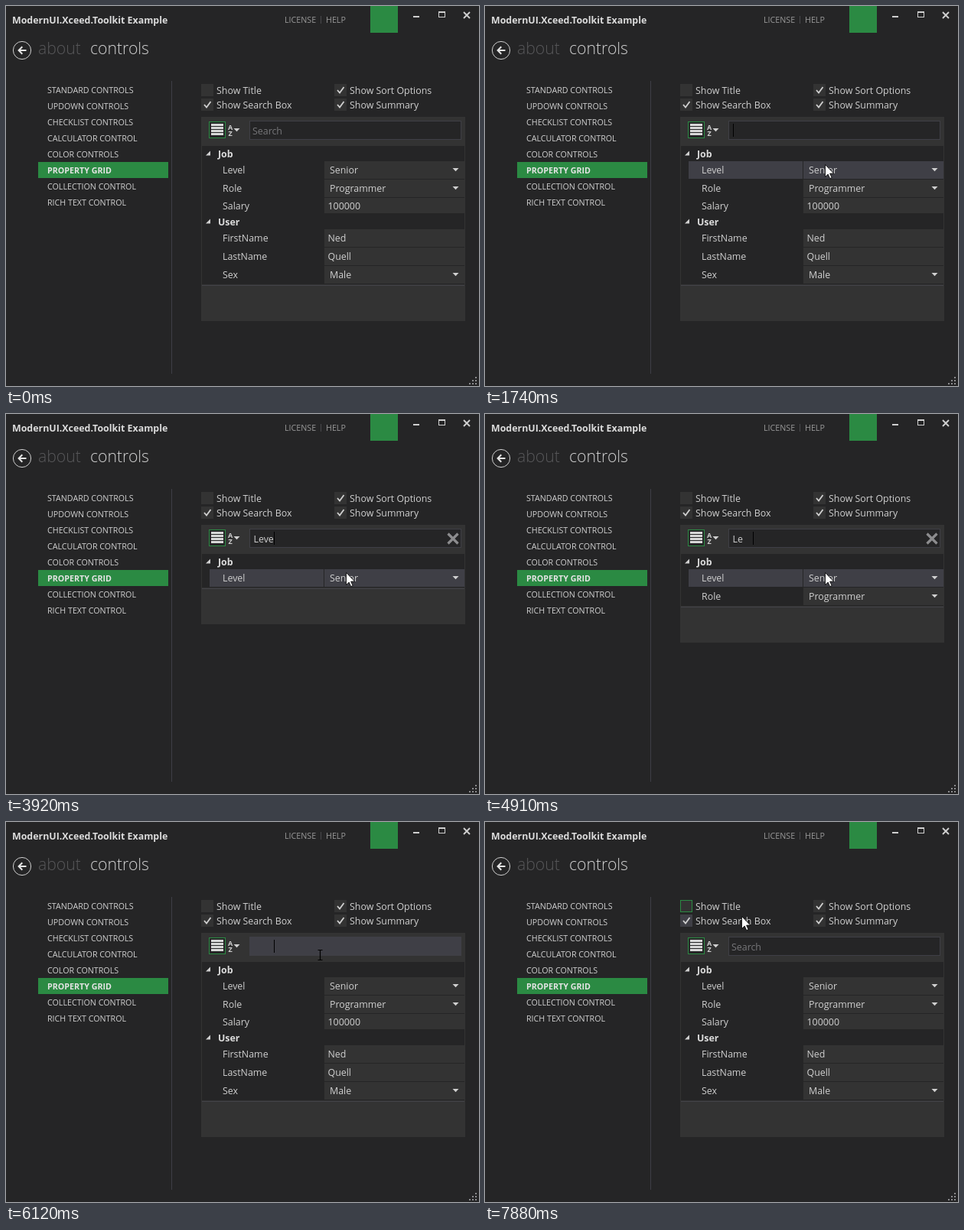
Recreate the animation shown at these times as an HTML page. Size 618 px wide and 497 px high, loop 8 s.

```html
<!DOCTYPE html>
<html lang="en">
<head>
<meta charset="utf-8">
<title>Property grid</title>
<style>
  html, body { margin: 0; width: 100%; height: 100%; overflow: hidden; background: #252526; }
  svg { display: block; width: 100%; height: 100%; }
  text { font-family: "Open Sans", "Noto Sans", sans-serif; font-size: 12.4px; fill: #d0d0d0; white-space: pre; }
  .bold { font-weight: 700; }
  .small { font-size: 10.7px; }
  .big { font-size: 21.2px; font-weight: 300; }
  .tiny { font-size: 9px; font-weight: 700; }
</style>
</head>
<body>
<svg id="stage" viewBox="0 0 618 497"><g id="frame"></g><g id="grid"></g></svg>
<script>
const LOOP = 8000;
const BG = '#252526', PANEL = '#333333', HOVER = '#3f3f46', GREEN = '#2b8a43', LIGHT = '#d0d0d0';

const MENU = ['STANDARD CONTROLS', 'UPDOWN CONTROLS', 'CHECKLIST CONTROLS', 'CALCULATOR CONTROL',
  'COLOR CONTROLS', 'PROPERTY GRID', 'COLLECTION CONTROL', 'RICH TEXT CONTROL'];

const GROUPS = [
  ['Job', [
    { name: 'Level', value: 'Senior', list: true, height: 24 },
    { name: 'Role', value: 'Programmer', list: true, height: 24 },
    { name: 'Salary', value: '100000', height: 21 }]],
  ['User', [
    { name: 'FirstName', value: 'Ned', height: 24 },
    { name: 'LastName', value: 'Quell', height: 24 },
    { name: 'Sex', value: 'Male', list: true, height: 24 }]]
];

// [time, x, y]: pointer positions, each held until the next
const POINTER = [
  [220, 470, 345], [320, 388, 177], [650, 372, 172], [760, 361, 170], [870, 356, 170],
  [1640, 410, 188], [1740, 444, 207], [5900, 443, 207], [6010, 432, 195], [6120, 410, 174],
  [6230, 382, 154], [6340, 354, 134], [6450, 336, 120], [6570, 326, 109],
  [7780, 331, 116], [7880, 335, 123]
];

// [time, typed text, applied filter]
const TYPING = [
  [0, '', ''], [2830, 'L', 'l'], [3160, 'Le', 'le'], [3390, 'Lev', 'le'], [3490, 'Lev', 'lev'],
  [3920, 'Leve', 'leve'], [4700, 'Lev', 'lev'], [4910, 'Le', 'le'], [5130, 'L', 'l'], [5350, '', '']
];

const FOCUS = 1420, BLUR = 6680, CARET_STUCK = 3920;
const TITLE_ON = 6800, PRESS_OFF = 7560, TITLE_OFF = 7670;

const rect = (x, y, w, h, fill, extra = '') =>
  `<rect x="${x}" y="${y}" width="${w}" height="${h}" fill="${fill}" ${extra}/>`;
const text = (x, y, s, cls = '', fill = LIGHT) =>
  `<text x="${x}" y="${y}" class="${cls}" style="fill:${fill}">${s}</text>`;
const path = (d, fill, extra = '') => `<path d="${d}" fill="${fill}" ${extra}/>`;
const line = (d, color, width = 1) => path(d, 'none', `stroke="${color}" stroke-width="${width}"`);
const box = (x, y, w, h, fill, stroke) => rect(x + .5, y + .5, w - 1, h - 1, fill, `stroke="${stroke}"`);
const arrowDown = (x, y) => path(`M${x} ${y}h8l-4 4.2z`, LIGHT);
const at = (keys, t) => keys.filter(k => k[0] <= t).pop();
const inside = (p, x, y, w, h) => !!p && p[1] >= x && p[1] < x + w && p[2] >= y && p[2] < y + h;

function windowFrame() {
  let s = rect(0, 0, 618, 497, BG);
  s += text(8, 23, 'ModernUI.Xceed.Toolkit Example', 'bold', '#dcdcdc');
  s += text(364, 22, 'LICENSE', 'small', '#999') + text(418, 22, 'HELP', 'small', '#999');
  s += rect(411, 13, 1, 10, '#4a4a4c') + rect(476, 0, 36, 35, GREEN);
  s += rect(532, 13, 8, 2, LIGHT);
  s += box(565, 7, 9, 8, 'none', LIGHT) + rect(565, 7, 9, 2, LIGHT);
  s += line('M598 8l8 8M606 8l-8 8', LIGHT, 1.9);

  s += `<circle cx="21" cy="58" r="11.6" fill="none" stroke="${LIGHT}"/>`;
  s += line('M26.5 58H16.8M21.3 53.3l-4.7 4.7l4.7 4.7', '#e4e4e4', 2);
  s += text(42, 63, 'about', 'big', '#58585a') + text(110, 63, 'controls', 'big');

  MENU.forEach((item, i) => {
    const selected = item === 'PROPERTY GRID';
    if (selected) s += rect(42, 204, 170, 21, GREEN);
    s += text(54, 114 + 21 * i, item, 'small' + (selected ? ' bold' : ''), selected ? '#e4e4e4' : LIGHT);
  });
  s += rect(216, 98, 1, 383, HOVER);

  for (let row = 0; row < 3; row++)
    for (let col = 0; col <= row; col++) s += rect(613 - 4 * col, 485 + 4 * row, 2, 2, '#8c8c8e');
  return s;
}

function checkbox(x, y, label, width, pointer, { checked = true, focused = false, pressed = false } = {}) {
  const hover = inside(pointer, x, y, width, 18);
  const fill = pressed ? GREEN : hover ? HOVER : PANEL;
  let s = focused || pressed ? box(x, y, 16, 16, fill, GREEN) : rect(x, y, 16, 16, fill);
  if (checked && !pressed) s += line(`M${x + 4} ${y + 8}l3 3.5l5.5 -7.5`, LIGHT, 1.8);
  return s + text(x + 20, y + 13, label);
}

function toolbar(t, pointer, y, typed) {
  let s = box(265, y + 6, 22, 22, BG, GREEN);
  for (let i = 0; i < 4; i++) s += rect(268, y + 9 + 4 * i, 16, 3, '#d8d8d8');
  s += text(290, y + 17, 'A', 'tiny') + text(290.5, y + 25, 'Z', 'tiny') + arrowDown(297.5, y + 15);

  const hover = inside(pointer, 318, y + 5, 277, 26);
  s += box(318, y + 5, 277, 25, hover ? HOVER : BG, HOVER);
  if (t >= FOCUS && t < BLUR) {
    const caret = t >= CARET_STUCK ? 350 : Math.round(324 + 6.5 * typed.length);
    s += text(323.5, y + 23, typed) + rect(caret, y + 9, 1, 17, '#000');
  } else {
    s += text(322, y + 23, 'Search', '', '#77777a');
  }
  if (typed) s += line(`M577.5 ${y + 11.5}l13 13M590.5 ${y + 11.5}l-13 13`, '#8c8c8e', 3.2);
  return s;
}

function propertyRow({ name, value, list, height }, y, pointer) {
  const hover = inside(pointer, 266, y, 333, height);
  const baseline = y + (height === 24 ? 17 : 16);
  let s = hover ? rect(266, y + 1, 149, height - 1, HOVER) : '';
  s += rect(416, y + 1, 183, height - 1, hover ? HOVER : PANEL);
  s += text(283, baseline, name) + text(list ? 423 : 420.5, baseline, value);
  return s + (list ? arrowDown(583.5, y + 10) : '');
}

function propertyGrid(t, pointer, titled) {
  const [, typed, filter] = at(TYPING, t);
  const top = titled ? 167 : 145, listTop = top + 38;
  let y = top + 37, rows = '';
  for (const [group, items] of GROUPS) {
    const shown = items.filter(item => item.name.toLowerCase().includes(filter));
    if (!shown.length) continue;
    rows += path(`M267 ${y + 7.5}v6h-6z`, LIGHT) + text(277, y + 16, group, 'bold', '#dcdcdc');
    y += 20;
    for (const item of shown) {
      rows += propertyRow(item, y, pointer);
      y += item.height;
    }
  }
  let s = rect(255, 145, 345, y + 49 - 145, PANEL);
  if (titled) s += text(262, 163, 'Person', 'bold', '#dcdcdc');
  s += rect(256, listTop, 343, y + 1 - listTop, BG) + rows;
  s += rect(256, y + 2, 343, 1, '#434348');
  return s + toolbar(t, pointer, top, typed);
}

function drawPointer(pointer) {
  if (!pointer) return '';
  const [, x, y] = pointer;
  if (inside(pointer, 318, 150, 277, 26))
    return line(`M${x - 2.5} ${y - 6.5}h2.5q.5 0 .5 1v11q0 1 -.5 1h-2.5M${x + 3.5} ${y - 6.5}h-2.5q-.5 0 -.5 1v11q0 1 .5 1h2.5`, '#000', 1.2);
  return path(`M${x + .5} ${y + .5}v16l3.7 -3.5l2.5 5.6l2.4 -1l-2.5 -5.5h5z`, '#fff', 'stroke="#000" stroke-width=".8"');
}

function scene(t) {
  const pointer = at(POINTER, t);
  const titled = t >= TITLE_ON && t < TITLE_OFF;
  const pressed = (t >= BLUR && t < TITLE_ON) || (t >= PRESS_OFF && t < TITLE_OFF);
  return checkbox(255, 102, 'Show Title', 80, pointer, { checked: titled, focused: t >= BLUR, pressed }) +
    checkbox(255, 121, 'Show Search Box', 119, pointer) +
    checkbox(429, 102, 'Show Sort Options', 130, pointer) +
    checkbox(429, 121, 'Show Summary', 110, pointer) +
    propertyGrid(t, pointer, titled) + drawPointer(pointer);
}

const grid = document.getElementById('grid');
document.getElementById('frame').innerHTML = windowFrame();
const start = performance.now();
let last = '';

function render() {
  const markup = scene(Math.max(0, performance.now() - start) % LOOP);
  if (markup !== last) grid.innerHTML = last = markup;
  requestAnimationFrame(render);
}
render();
</script>
</body>
</html>
```
